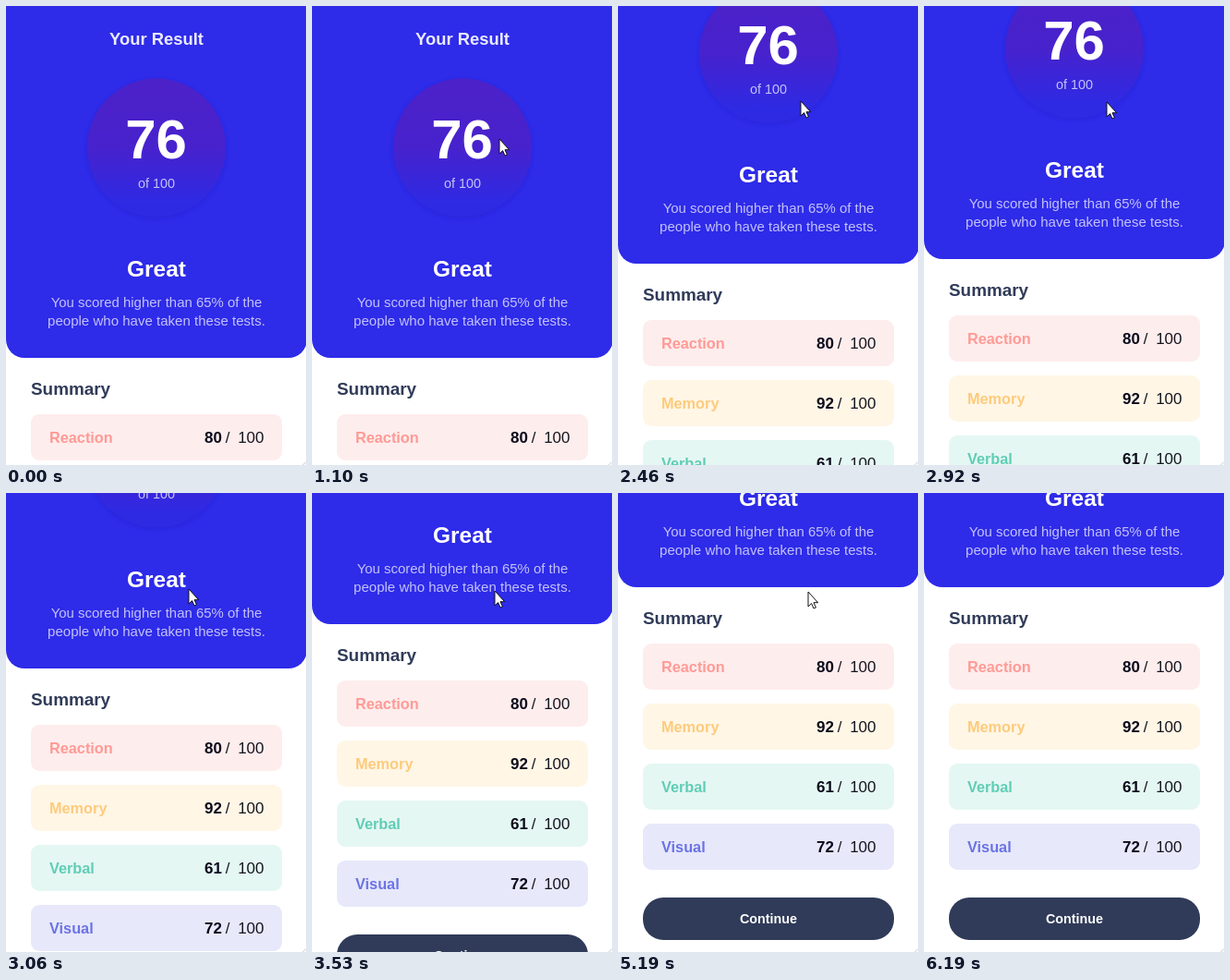
Write an HTML page that moves like this. It is 325 px wide and 497 px high and loops after 6.59 s.

```html
<!DOCTYPE html>
<html lang="en">
<head>
<meta charset="utf-8">
<title>Result summary</title>
<style>
  html, body { margin: 0; width: 100%; height: 100%; overflow: hidden; background: #fff; }
  svg { display: block; width: 325px; height: 497px; }
  text { font-family: "Liberation Sans", Arial, sans-serif; }
  .b { font-weight: 700; }
  .mid { text-anchor: middle; }
  .soft { fill: #c3c2fa; }
</style>
</head>
<body>
<svg viewBox="0 0 325 497">
  <defs>
    <linearGradient id="disc" x1="0" y1="0" x2="0" y2="1">
      <stop offset="0" stop-color="#4d21c8"/>
      <stop offset=".5" stop-color="#4722cd"/>
      <stop offset=".9" stop-color="#2e2ae4"/>
    </linearGradient>
    <filter id="blur" x="-10%" y="-10%" width="120%" height="120%">
      <feGaussianBlur stdDeviation="2"/>
    </filter>
  </defs>
  <g id="page">
    <rect y="-40" width="326" height="421" rx="20" fill="#2e2be9"/>
    <text class="b mid" x="163" y="42" font-size="18.4" fill="#ecebff">Your Result</text>
    <circle cx="163" cy="155" r="75" fill="#231fc4" opacity=".45" filter="url(#blur)"/>
    <circle cx="163" cy="153.5" r="75" fill="url(#disc)"/>
    <text class="b mid" x="162.5" y="165" font-size="60" fill="#fff">76</text>
    <text class="mid soft" x="163" y="197" font-size="14.4">of 100</text>
    <text class="b mid" x="163" y="293" font-size="24.5" fill="#fff">Great</text>
    <text class="mid soft" x="163" y="326" font-size="14.95">You scored higher than 65% of the</text>
    <text class="mid soft" x="163" y="346" font-size="15.05">people who have taken these tests.</text>
    <text class="b" x="27" y="421" font-size="18.9" fill="#303b59">Summary</text>
    <g id="rows"></g>
    <rect x="27" y="717" width="272" height="46" rx="22" fill="#303b59"/>
    <text class="b mid" x="163" y="745" font-size="14.3" fill="#fff">Continue</text>
  </g>
  <path d="M321.5 497L325 493.5" stroke="#c9c4cc" fill="none"/>
  <g id="cursor">
    <path id="arrow" d="M1 1V17L4.6 13.6L7 19L9.4 18L7 12.7H11.7Z" fill="#fff" stroke="#111" stroke-linejoin="round"/>
    <path id="beam" d="M-2.5 -7.5H-1L.5 -6.5L2 -7.5H3.5M.5 -6.5V6.5M-2.5 7.5H-1L.5 6.5L2 7.5H3.5" fill="none" stroke="#fff"/>
  </g>
</svg>
<script>
const LOOP = 6590;
const el = id => document.getElementById(id);

const rows = [
  ["Reaction", 80, "#ff9a95", "#feeded"],
  ["Memory", 92, "#fdcb7c", "#fff6e6"],
  ["Verbal", 61, "#60cdb6", "#e5f7f3"],
  ["Visual", 72, "#6a73e4", "#e7e8fa"]
];
el("rows").innerHTML = rows.map(([name, score, ink, tint], i) => `
  <g transform="translate(0 ${442 + i * 65})">
    <rect x="27" width="272" height="50" rx="9" fill="${tint}"/>
    <text class="b" x="47" y="31" font-size="16.3" fill="${ink}">${name}</text>
    <text class="b" x="215" y="31" font-size="17" fill="#0b0b1c">${score}</text>
    <text x="279.5" y="31" font-size="17" text-anchor="end" word-spacing="4" fill="#15151f">/ 100</text>
  </g>`).join("");

// Wheel notches: 102 px each, the last one stopped by the page end.
const NOTCH = 102, PAGE_END = 279;
const notches = [2250, 2920, 3460];
const wheel = [.05, .46, .873, 1];

function scrollAt(t) {
  return notches.reduce((pos, start, i) => {
    const step = Math.floor((t - start) / 70);
    if (step < 0) return pos;
    const size = Math.min(NOTCH, PAGE_END - i * NOTCH);
    return pos + Math.round(size * wheel[Math.min(step, 3)]);
  }, 0);
}

// Pointer glides: start, end, steps, then from, bend and to points.
const glides = [
  [300, 700, 7, [307, 482], [255, 320], [195, 180]],
  [900, 1240, 6, [199, 168], [206, 130], [197, 102]],
  [2720, 4330, 3, [197, 103], [197, 105], [197, 106]],
  [5190, 5790, 10, [205, 106], [254, 200], [294, 394]],
  [5860, 6190, 6, [295, 405], [300, 440], [304, 520]]
];
const ease = u => (1 - Math.cos(Math.PI * u)) / 2;

function pointerAt(t) {
  const glide = glides.findLast(g => t >= g[0]);
  if (!glide) return [307, 520];
  const [start, end, steps, a, bend, b] = glide;
  const gap = (end - start) / (steps - 1);
  const u = ease(Math.min(1, Math.floor((t - start) / gap + .01) / (steps - 1)));
  return a.map((p, i) =>
    Math.round((1 - u) ** 2 * p + 2 * u * (1 - u) * bend[i] + u * u * b[i]));
}

const show = (id, on) => el(id).setAttribute("visibility", on ? "visible" : "hidden");

function draw(now) {
  const t = now % LOOP;
  const [x, y] = pointerAt(t);
  const overText = t >= 700 && t < 900;
  el("page").setAttribute("transform", `translate(0 ${-scrollAt(t)})`);
  el("cursor").setAttribute("transform", `translate(${x} ${y})`);
  show("arrow", !overText);
  show("beam", overText);
}

const begin = performance.now();
function tick() {
  draw(performance.now() - begin);
  requestAnimationFrame(tick);
}
tick();
</script>
</body>
</html>
```
